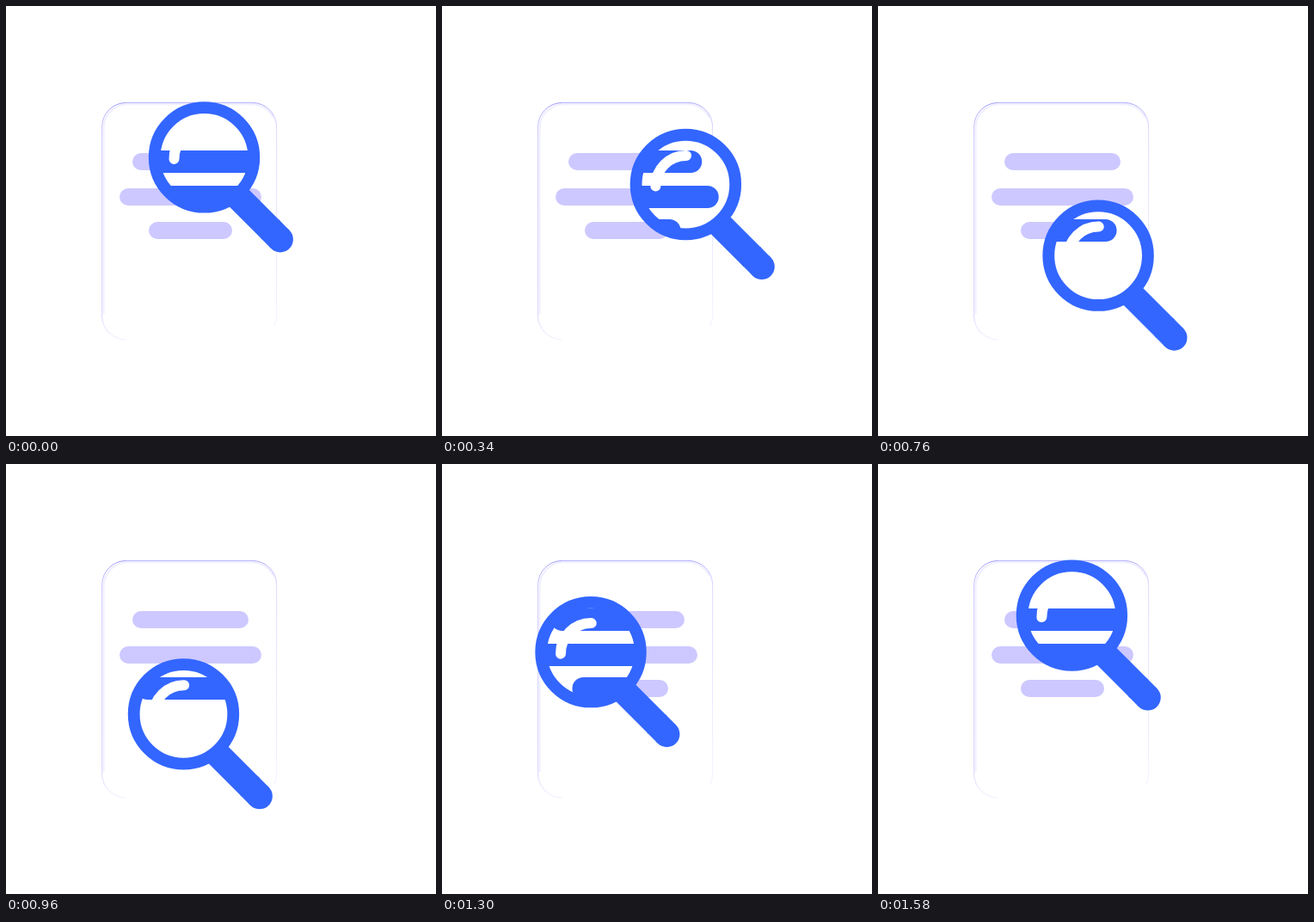
Recreate the animation shown at these times as an HTML page. Size 500 px wide and 500 px high, loop 1.6 s.

```html
<!DOCTYPE html>
<html lang="en">
<head>
<meta charset="utf-8">
<title>Document search</title>
<style>
  html, body { margin: 0; width: 100%; height: 100%; overflow: hidden; background: #fff; }
  svg { display: block; width: 100vw; height: 100vh; }
</style>
</head>
<body>
<svg viewBox="0 0 500 500">
  <defs>
    <clipPath id="lens"><circle id="hole" r="52"/></clipPath>
    <linearGradient id="side" x1="0" y1="112" x2="0" y2="388" gradientUnits="userSpaceOnUse">
      <stop offset="0" stop-color="#9d98fa"/>
      <stop offset=".12" stop-color="#cfcbff"/>
      <stop offset=".9" stop-color="#d8d5ff"/>
      <stop offset="1" stop-color="#f0efff"/>
    </linearGradient>
    <linearGradient id="edge" x1="0" y1="112" x2="0" y2="372" gradientUnits="userSpaceOnUse">
      <stop offset="0" stop-color="#aaa5fb"/>
      <stop offset=".12" stop-color="#dedbff"/>
      <stop offset="1" stop-color="#f3f2ff"/>
    </linearGradient>
  </defs>

  <g fill="none">
    <path d="M113.5 358V142A28 28 0 0 1 141 114.3H286A28 28 0 0 1 311 130" stroke="#efeeff" stroke-width="2"/>
    <path d="M140 388A28 28 0 0 1 111.6 360V140A28 28 0 0 1 139.5 112.5" stroke="url(#side)"/>
    <path d="M139 112.5H287" stroke="#b9b5ff"/>
    <path d="M287 112.5A28 28 0 0 1 314.6 140V360Q314.6 367 312 372" stroke="url(#edge)"/>
  </g>

  <g id="lines" fill="#cdc8ff"></g>

  <g id="glass">
    <circle r="58" fill="#fff"/>
  </g>
  <g id="zoomed" fill="#36f" clip-path="url(#lens)"></g>
  <g id="frame" fill="none">
    <path d="M-35 2A35.2 35.2 0 0 1 .7 -33.6" stroke="#fff" stroke-width="12" stroke-linecap="round"/>
    <circle r="57.8" stroke="#36f" stroke-width="13.8"/>
    <path d="M36 43L78 85" stroke="#36f" stroke-width="30"/>
    <circle cx="88.4" cy="95.5" r="15" fill="#36f"/>
    <path d="M76 83L88.4 95.5" stroke="#36f" stroke-width="30"/>
  </g>
</svg>
<script>
  const LOOP = 1600, STEP = 20, TURN = 495;
  const CX = 230.5, CY = 235.9, R = 60, MID = 214.5, ZOOM = 1.3;
  const BARS = [[181, 135], [222, 165], [261, 97]]; // centre y, width
  const $ = id => document.getElementById(id);

  function addBars(group, scale) {
    const h = 20 * scale;
    for (const [y, width] of BARS) {
      const bar = document.createElementNS("http://www.w3.org/2000/svg", "rect");
      const w = width * scale;
      const box = { x: MID - w / 2, y: y - h / 2, width: w, height: h, rx: h / 2 };
      for (const key in box) bar.setAttribute(key, box[key]);
      group.append(bar);
    }
  }

  // The first quarter turn is slower than the other three.
  function angle(t) {
    const quarters = t < TURN ? t / TURN : 1 + 3 * (t - TURN) / (LOOP - TURN);
    return quarters * Math.PI / 2;
  }

  function draw(ms) {
    const a = angle(Math.floor((ms % LOOP) / STEP) * STEP);
    const x = CX + R * Math.sin(a), y = CY - R * Math.cos(a);
    const move = `translate(${x.toFixed(2)} ${y.toFixed(2)})`;
    for (const id of ["hole", "glass", "frame"]) $(id).setAttribute("transform", move);
  }

  addBars($("lines"), 1);
  addBars($("zoomed"), ZOOM);

  let start;
  function tick(now) {
    start ??= now;
    draw(Math.max(0, now - start));
    requestAnimationFrame(tick);
  }
  draw(0);
  requestAnimationFrame(tick);
</script>
</body>
</html>
```
